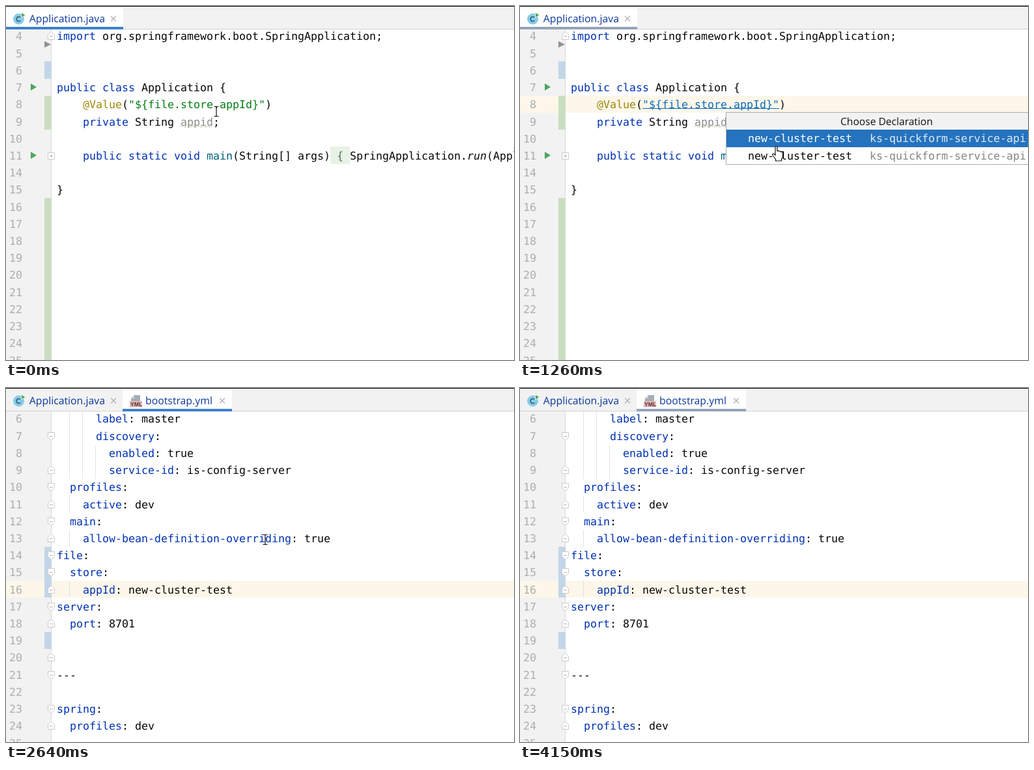
These frames come from a looping animation (780 px wide and 544 px high, 4.31 s). An HTML page:

```html
<!DOCTYPE html>
<html lang="en">
<head>
<meta charset="utf-8">
<title>Jump to declaration</title>
<style>
  html, body { margin: 0; width: 100%; height: 100%; overflow: hidden; background: #fff; }
  svg { display: block; width: 780px; height: 544px; }
  text { white-space: pre; text-rendering: geometricPrecision; }
  .code { font: 16.61px "DejaVu Sans Mono", monospace; fill: #080808; }
  .ui { font: 15.8px "Open Sans", sans-serif; fill: #0b389c; }
  .title { font-size: 15.6px; fill: #111; }
  .num { fill: #adadad; }
  .key { fill: #0033b3; }
  .note { fill: #9e880d; }
  .str { fill: #067d17; }
  .link { fill: #0f6cbd; }
  .fn { fill: #00627a; }
  .dim { fill: #8c8c8c; }
  .brace { fill: #54705a; }
  .it { font-style: italic; }
</style>
</head>
<body>
<svg id="stage" viewBox="0 0 780 544" xmlns="http://www.w3.org/2000/svg"></svg>
<script>
const LOOP = 4310, STEP = 26.22, COL = 10, LEFT = 78;
const stage = document.getElementById('stage');

const rect = (x, y, w, h, fill, extra = '') =>
  `<rect x="${x}" y="${y}" width="${w}" height="${h}" fill="${fill}" ${extra}/>`;
const path = (d, stroke, fill = 'none', extra = '') =>
  `<path d="${d}" stroke="${stroke}" fill="${fill}" ${extra}/>`;
const group = (id, body) => `<g id="${id}">${body}</g>`;
const label = (x, y, cls, body, extra = '') =>
  `<text x="${x}" y="${y}" class="${cls}" ${extra}>${body}</text>`;

// Parts are plain strings or [class, string] pairs.
const code = (x, y, ...parts) => label(x, y, 'code', parts.map(p =>
  typeof p === 'string' ? p : `<tspan class="${p[0]}">${p[1]}</tspan>`).join(''));

// Text sits on whole pixels, as in a hinted editor.
const baseline = (top, i) => Math.round(top + i * STEP + 6);

function lineNumbers(numbers, top) {
  return numbers.map((n, i) =>
    label(25 - COL * String(n).length, baseline(top, i), 'code num', n)).join('');
}

function foldMark(y, kind) {
  const shapes = {
    open: 'M64.5 -5.5H74.5V2L69.5 6.5L64.5 2Z',
    close: 'M64.5 5.5H74.5V-2L69.5 -6.5L64.5 -2Z',
    plus: 'M64.5 -4.5H74.5V5.5H64.5Z'
  };
  const sign = kind === 'plus' ? 'M67 .5H72M69.5 -2V3' : 'M67 .5H72';
  return `<g transform="translate(0 ${Math.round(y)})">` +
    path(shapes[kind], '#cbcbcb', '#fff') + path(sign, '#b5b5b5') + '</g>';
}

const gutter = rect(0, 36, 69, 508, '#f2f2f2') + rect(69, 36, 1, 508, '#d9d9d9');
const mark = (y, h, fill) => rect(59, y, 11, h, fill);
const caret = (id, x, y) => rect(x, y, 2, 22, '#000', `id="${id}"`);
const runIcon = y => path(`M38 ${y - 5.5}L47 ${y}L38 ${y + 5.5}Z`, 'none', '#4da760');
const cross = x => path(`M${x - 4} 15.5l8 8m0 -8l-8 8`, '#b0b0b0', 'none', 'stroke-width="1.2"');

function javaEditor() {
  const top = 46.4, y = i => baseline(top, i);
  const blue = '#c3d6e8', green = '#c9dec1';
  const wave = 'M268 186' + 'l2 -2l2 0l2 2l2 0'.repeat(6);
  return group('java', rect(0, 36, 780, 508, '#fff') + gutter +
    rect(0, 138, 780, 26, '#fdf7ea', 'id="javaLine"') +
    mark(85, 27, blue) + mark(138, 52, green) + mark(295, 249, green) +
    lineNumbers([4, 5, 6, 7, 8, 9, 10, 11, 14, 15, 16, 17, 18, 19, 20, 21, 22, 23, 24, 25], top) +
    path('M59 54L69 59L59 64Z', 'none', '#929292') + runIcon(124.5) + runIcon(229.5) +
    foldMark(46, 'close') + foldMark(230, 'plus') +
    code(LEFT, y(0), ['key', 'import'], ' org.springframework.boot.SpringApplication;') +
    code(LEFT, y(3), ['key', 'public class'], ' Application {') +
    code(118, y(4), ['note', '@Value'], '(') +
    label(188, y(4), 'code str', '"${file.store.appId}"', 'id="value"') +
    rect(188, 157, 210, 1, '#0f6cbd', 'id="underline"') +
    code(398, y(4), ')') +
    code(118, y(5), ['key', 'private'], ' String ', ['dim', 'appid'], ';') +
    path(wave, '#c4c4b4') +
    rect(498, 216, 30, 27, '#e8f2e5') +
    code(118, y(7), ['key', 'public static void '], ['fn', 'main'], '(String[] args)',
      ['brace', ' { '], 'SpringApplication.', ['it', 'run'], '(Application.class') +
    code(LEFT, y(9), '}') + caret('javaCaret', 317, 140));
}

function ymlEditor() {
  const top = 47.4, blue = '#c3d6e8';
  // Indent, key, value.
  const lines = [
    [6, 'label', 'master'], [6, 'discovery'], [8, 'enabled', 'true'],
    [8, 'service-id', 'is-config-server'], [2, 'profiles'], [4, 'active', 'dev'],
    [2, 'main'], [4, 'allow-bean-definition-overriding', 'true'], [0, 'file'], [2, 'store'],
    [4, 'appId', 'new-cluster-test'], [0, 'server'], [2, 'port', '8701'],
    null, null, null, null, [0, 'spring'], [2, 'profiles', 'dev']
  ];
  const text = lines.map((line, i) => line ? code(LEFT + line[0] * COL, baseline(top, i),
    ['key', line[1]], ':' + (line[2] ? ' ' + line[2] : '')) : '').join('');
  // One letter per row: o opens a fold, c closes it.
  const folds = [...'-o-cocococoococ-co-oc'.replace('cocococoococ', 'cocococ'.slice(0, 5) + 'oococ')];
  const marks = [...'-o-cococoococ-co-oc'].map((c, i) =>
    c === '-' ? '' : foldMark(top + i * STEP, c === 'o' ? 'open' : 'close')).join('');
  const guides = 'M97.5 36V140M117.5 36V140M137.5 88V140M97.5 165V191M97.5 218V244M97.5 296V322';
  return group('yml', rect(0, 36, 780, 508, '#fff') + gutter +
    rect(0, 296, 780, 26, '#fdf7ea') + mark(244, 78, blue) + mark(375, 26, blue) +
    lineNumbers(Array.from({ length: 20 }, (_, i) => i + 6), top) + marks +
    group('guides', path(guides, '#e2e2e2')) + text +
    code(LEFT, baseline(top, 15), '---') + caret('ymlCaret', 187, 299));
}

function tabs() {
  const classIcon = '<circle cx="19.5" cy="20" r="8.5" fill="#86cce8"/>' +
    path('M22.4 17.6A3.6 3.6 0 1 0 22.4 22.4', '#33566b', 'none', 'stroke-width="1.5"') +
    path('M23.5 10L30 14L23.5 18Z', '#f2f2f2', '#4da54f');
  const ymlIcon = path('M197 11H206V20H192V16Z', 'none', '#a4adb4') +
    path('M192 16L197 11V16Z', 'none', '#cbd0d4') + rect(190, 20, 19, 9.5, '#e5b5b5') +
    '<text x="191" y="28.3" font-family="Liberation Sans, sans-serif" font-size="8.6" font-weight="700" fill="#4a3236">YML</text>';
  return rect(0, 0, 780, 36, '#f2f2f2') + rect(0, 35, 780, 1, '#d1d1d1') +
    rect(0, 1, 180, 34, '#fff', 'id="tabBack"') +
    rect(0, 32, 180, 4, '#3c83c9', 'id="tabLine"') + rect(0, 0, 780, 1, '#000') +
    classIcon + label(35.8, 25, 'ui', 'Application.java') + cross(165) +
    group('ymlTab', ymlIcon + label(214, 25, 'ui', 'bootstrap.yml') + cross(332));
}

function popup() {
  const row = (id, y) => group(id, rect(317, y, 463, 27, '#2573be') +
    label(350, Math.round(y + 19), 'code', 'new-cluster-test') +
    label(537, Math.round(y + 19), 'code', 'ks-quickform-service-api'));
  return group('popup', rect(316.5, 163.5, 470, 80, '#fff', 'stroke="#adadad"') +
    rect(317, 164, 463, 26, '#f2f2f2') +
    label(492, 183, 'ui title', 'Choose Declaration') +
    row('first', 190) + row('second', 216.5) + rect(316, 243, 464, 1, '#adadad'));
}

const beam = group('beam', path('M-3.5 -7.5H-1Q0 -7.5 0 -6.5Q0 -7.5 1 -7.5H3.5M0 -6.5V6.5M-3.5 7.5H-1Q0 7.5 0 6.5Q0 7.5 1 7.5H3.5',
  '#111', 'none', 'stroke-width="1.2"'));
const hand = group('hand', path('M-4 2V-9Q-4 -10.5 -2.5 -10.5T-1 -9V-3Q.5 -4.5 2 -2.5Q4 -3.8 5 -1.6Q7.5 -2.5 7.5 .5V5Q7.5 7.5 5.5 9.5V12H-3.5V9.5L-8 3.5Q-9 1.5 -7.5 1T-4 3.5Z',
  '#111', '#fff', 'stroke-width="1.2" stroke-linejoin="round"'));

stage.innerHTML = javaEditor() + ymlEditor() + tabs() + popup() + group('pointer', beam + hand);

const el = {};
stage.querySelectorAll('[id]').forEach(node => { el[node.id] = node; });
const show = (name, on) => { el[name].style.display = on ? '' : 'none'; };
const within = (t, from, to) => t >= from && t < to;

// Pointer way points: time, x, y.
const route = [
  [40, 323, 162], [240, 327, 160], [980, 327, 160], [1260, 396, 226], [1460, 398, 233],
  [2930, 398, 233], [3210, 284, 286], [3420, 166, 309], [3460, 166, 309],
  [3950, 676, 534], [4010, 692, 560]
];

function pointerAt(t) {
  const next = route.findIndex(p => p[0] > t);
  if (next === 0) return route[0].slice(1);
  if (next < 0) return route[route.length - 1].slice(1);
  const [t0, x0, y0] = route[next - 1], [t1, x1, y1] = route[next];
  const k = (t - t0) / (t1 - t0);
  return [x0 + (x1 - x0) * k, y0 + (y1 - y0) * k];
}

function paintRow(name, selected) {
  const [back, title, module] = el[name].children;
  back.style.display = selected ? '' : 'none';
  title.style.fill = selected ? '#fff' : '#080808';
  module.style.fill = selected ? '#dfeaf5' : '#858585';
}

function draw(t) {
  const yml = t >= 1710, linked = t >= 120, [x, y] = pointerAt(t);
  const unfocused = within(t, 490, 1710) || t >= 4110;
  show('java', !yml);
  show('yml', yml);
  show('ymlTab', yml);
  show('javaLine', t >= 410);
  show('javaCaret', within(t, 410, 490));
  show('underline', linked);
  el.value.setAttribute('class', linked ? 'code link' : 'code str');
  show('guides', t >= 2030);
  show('ymlCaret', within(t, 1710, 2600) || within(t, 3130, 3660));
  show('popup', within(t, 490, 1670));
  paintRow('first', y <= 227);
  paintRow('second', y > 227);
  for (const name of ['tabBack', 'tabLine']) {
    el[name].setAttribute('x', yml ? 179 : 0);
    el[name].setAttribute('width', yml ? 168 : 180);
  }
  el.tabLine.setAttribute('fill', unfocused ? '#94a3b8' : '#3c83c9');
  show('hand', linked && !yml);
  show('beam', !linked || yml);
  el.pointer.setAttribute('transform', `translate(${x.toFixed(1)} ${y.toFixed(1)})`);
}

const start = performance.now();
function tick() {
  draw((performance.now() - start) % LOOP);
  requestAnimationFrame(tick);
}
draw(0);
tick();
</script>
</body>
</html>
```
